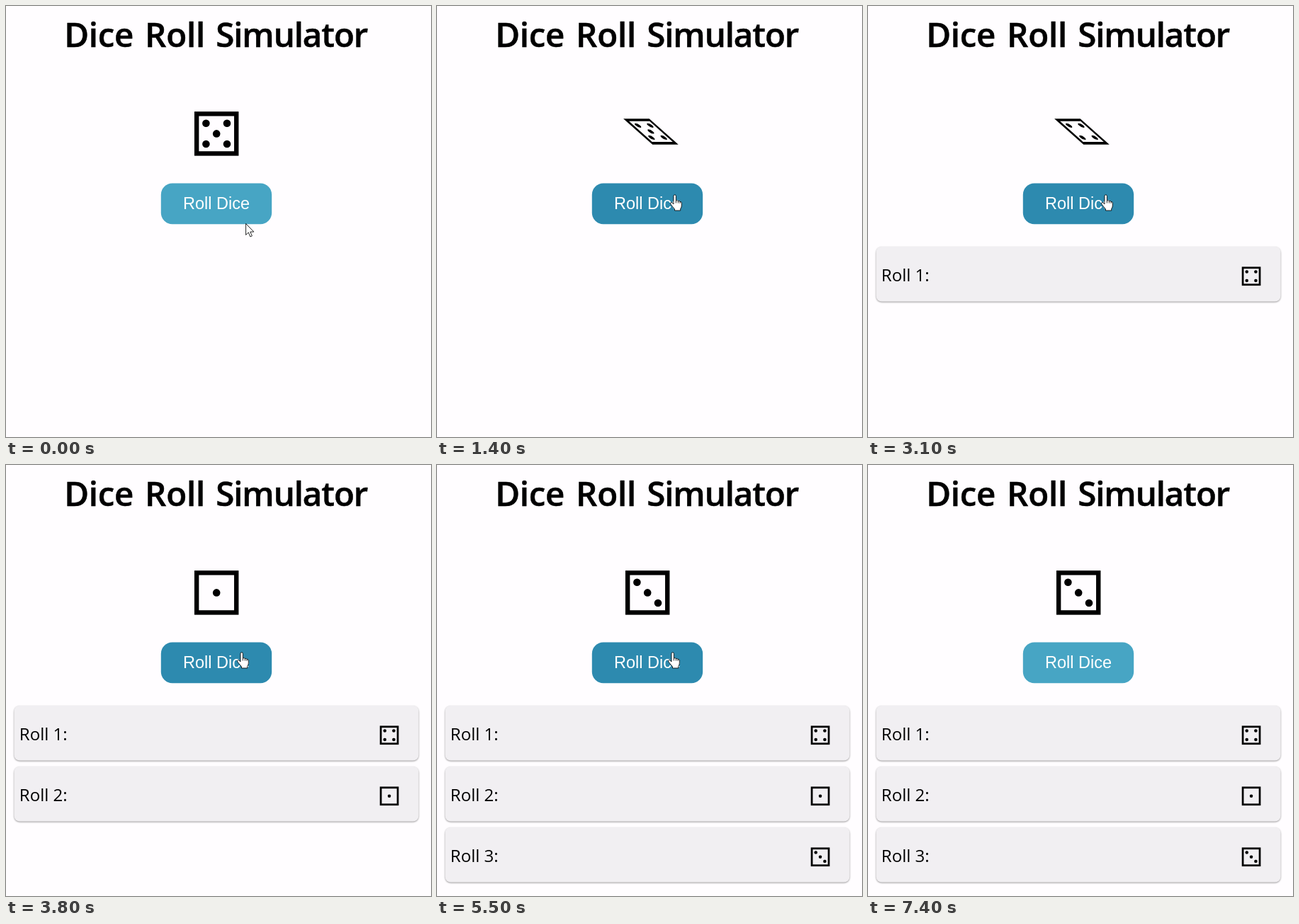
Write an HTML page that moves like this. It is 600 px wide and 609 px high and loops after 8 s.

```html
<!DOCTYPE html>
<html lang="en">
<head>
<meta charset="utf-8">
<title>Dice Roll Simulator</title>
<style>
  html, body { margin: 0; width: 100%; height: 100%; overflow: hidden; background: #fffdff; }
  svg { display: block; width: 600px; height: 609px; }
  .title { font: 600 47.5px "Open Sans", "Noto Sans", sans-serif; stroke: #000; stroke-width: .5; }
  .label { font: 400 24px "Open Sans", "Noto Sans", sans-serif; }
  .btn { font: 23.5px "Liberation Sans", Arial, sans-serif; fill: #fff; text-anchor: middle; }
  .row rect.card { fill: #f1eff2; filter: drop-shadow(0 1px 1px rgba(0, 0, 0, .4)); }
  .cursor { fill: #fff; stroke: #000; stroke-width: .85; stroke-linejoin: round; }
</style>
</head>
<body>
<svg viewBox="0 0 600 609" xmlns="http://www.w3.org/2000/svg">
  <rect width="600" height="609" fill="#fffdff"/>
  <g class="title">
    <text x="82.2" y="57.8" letter-spacing="-.3">Dice</text>
    <text x="196" y="57.8" letter-spacing="-.2">Roll</text>
    <text x="296.2" y="57.8" letter-spacing="-1.1">Simulator</text>
  </g>
  <g id="die"></g>
  <rect id="button" x="218.8" y="250.5" width="156.4" height="57.8" rx="16"/>
  <text class="btn" x="297" y="287.4">Roll Dice</text>
  <g id="rows"></g>
  <path id="arrow" class="cursor" d="M0 0V16l3.7-3.5 2.6 6 2.5-1.1-2.6-5.8H11.3Z"/>
  <path id="hand" class="cursor" d="M5 14V2.5a1.7 1.7 0 0 1 3.4 0V9q1.7-1 3 .6q1.8-.7 2.6 .9q2-.4 2.3 1.6V16q0 2.5-1.6 4.6V23H6.5V21Q4 18 1 14.2Q0 12.4 1.4 11.6Q3 11.2 5 14ZM8.4 9v3.5M11.4 9.6v3M14 10.5v2.4"/>
</svg>
<script>
const LOOP = 8000, STEP = 100, ROLL = 1000;
const ROLLS = [
  { start: 1067, shown: 2200, value: 4 },
  { start: 2767, shown: 3800, value: 1 },
  { start: 4467, shown: 5500, value: 3 }
];
const FIRST_FACE = 5, LEAVE = 7300;
const LIGHT = [71, 165, 196], DARK = [45, 138, 175];

const $ = id => document.getElementById(id);
const clamp = v => Math.max(0, Math.min(1, v));
const mix = (a, b, k) => a + (b - a) * k;

// CSS "ease": cubic-bezier(.25, .1, .25, 1)
function ease(x) {
  x = clamp(x);
  if (x === 0 || x === 1) return x;
  const curve = (u, a, b) => 3 * u * (1 - u) * (1 - u) * a + 3 * u * u * (1 - u) * b + u * u * u;
  let lo = 0, hi = 1;
  for (let i = 0; i < 30; i++) {
    const mid = (lo + hi) / 2;
    if (curve(mid, .25, .25) < x) lo = mid; else hi = mid;
  }
  return curve(lo, .1, 1);
}

// Die face centred on the origin, 62.5 px wide
function face(n) {
  const spots = [];
  if (n % 2) spots.push([0, 0]);
  if (n > 1) spots.push([-1, -1], [1, 1]);
  if (n > 3) spots.push([1, -1], [-1, 1]);
  if (n > 5) spots.push([-1, 0], [1, 0]);
  return '<rect x="-28.05" y="-28.05" width="56.1" height="56.1" fill="none" stroke="#000" stroke-width="6.4"/>' +
    spots.map(([x, y]) => `<circle cx="${x * 14.8}" cy="${y * 14.6}" r="5.3"/>`).join('');
}

$('rows').innerHTML = ROLLS.map((r, i) =>
  `<g class="row" transform="translate(0 ${340 + i * 86})">
    <rect class="card" x="11.5" y="0" width="571" height="77.6" rx="8"/>
    <text class="label" x="18.8" y="49">Roll ${i + 1}:</text>
    <g transform="translate(541.1 41.8) scale(.427)">${face(r.value)}</g>
  </g>`).join('');
const rows = [...$('rows').children];

const show = (el, on) => el.setAttribute('visibility', on ? 'visible' : 'hidden');

let lastFace = 0;
function drawDie(t) {
  let n = FIRST_FACE, angle = 0;
  for (const r of ROLLS) {
    if (t >= r.shown) n = r.value;
    const p = (t - r.start) / ROLL;
    if (p > 0 && p < 1) angle = ease(p) * 4 * Math.PI;
  }
  if (n !== lastFace) $('die').innerHTML = face(lastFace = n);
  // Flat view of rotateY(angle) rotateX(angle)
  const c = Math.cos(angle), s = Math.sin(angle);
  $('die').setAttribute('transform',
    `translate(297.2 173.2) matrix(${c} 0 ${s * s} ${c} 0 0) translate(0 7.2)`);
}

function drawButton(t) {
  const k = t < LEAVE ? ease((t - 100) / 300) : 1 - clamp((t - LEAVE + 100) / 200);
  $('button').setAttribute('fill', `rgb(${LIGHT.map((v, i) => Math.round(mix(v, DARK[i], k)))})`);
}

function drawCursor(t) {
  const k = ease(t / 900);
  let x = mix(338.6, 335.7, k), y = mix(307.5, 266.8, k);
  if (t >= 3300) { x -= 3; y -= 2; }
  const over = t >= 100;
  show($('arrow'), !over);
  show($('hand'), over && t < LEAVE);
  $('arrow').setAttribute('transform', `translate(${x} ${y})`);
  $('hand').setAttribute('transform', `translate(${x - 6.7} ${y - .8})`);
}

function draw(ms) {
  const t = Math.floor((ms % LOOP) / STEP) * STEP;
  drawDie(t);
  drawButton(t);
  drawCursor(t);
  rows.forEach((row, i) => show(row, t >= ROLLS[i].shown));
}

let begin = null;
function tick(now) {
  if (begin === null) begin = now;
  draw(Math.max(0, now - begin));
  requestAnimationFrame(tick);
}
draw(0);
requestAnimationFrame(tick);
</script>
</body>
</html>
```
